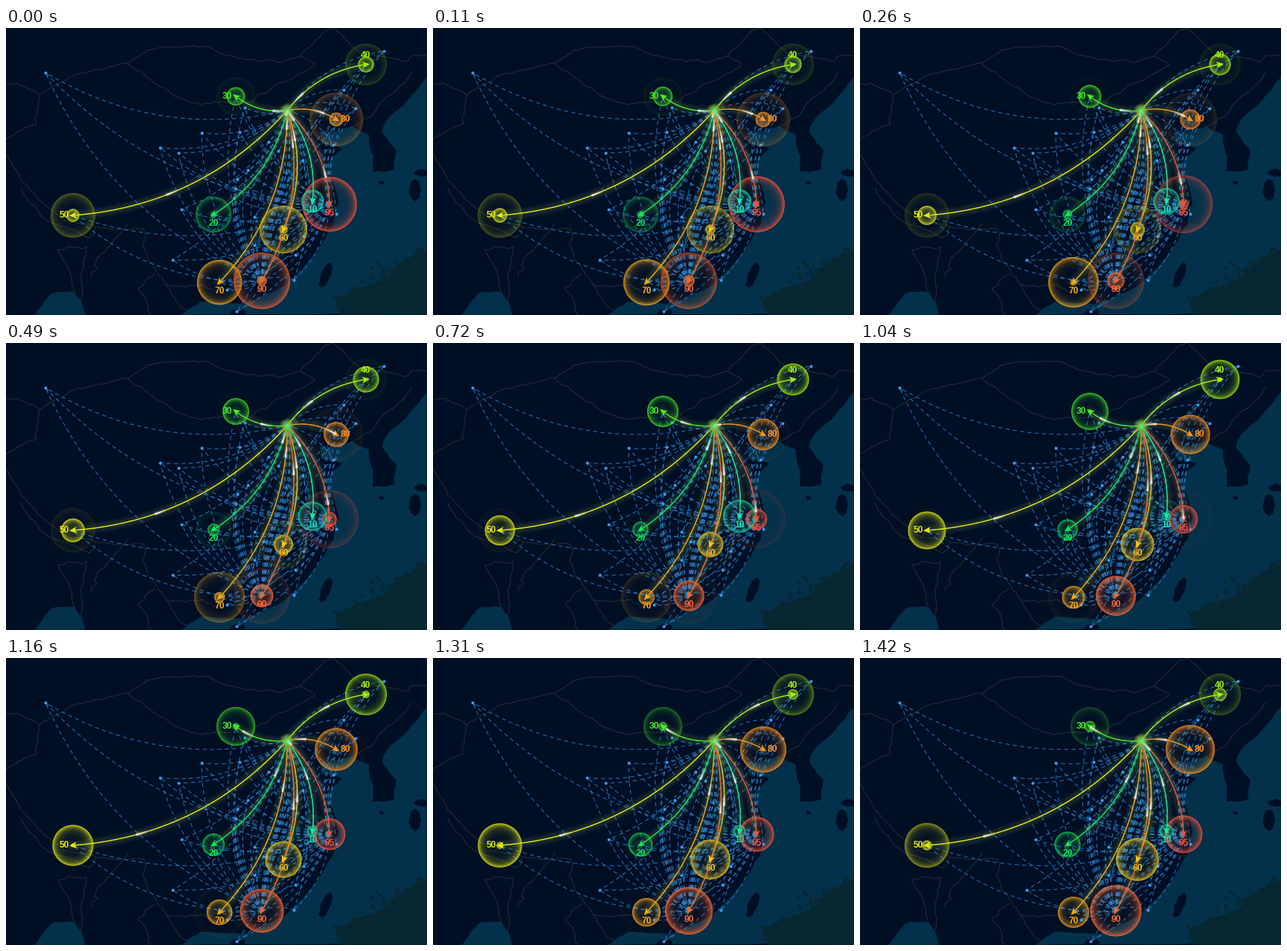
Animation, 566 px wide and 386 px high, one loop 1.52 s. Source, as a matplotlib script:

```python
import matplotlib.pyplot as plt
import numpy as np
from matplotlib.animation import FuncAnimation
from matplotlib.collections import LineCollection
from matplotlib.colors import LinearSegmentedColormap, to_rgb
from matplotlib.patches import Polygon

W, H, DPI = 566, 386, 64
PX = 72 / DPI                       # one pixel in points
TICK, LOOP = 10, 1520
STEP = 63.3                         # the picture holds for about this long
LAND, SEA, SHOAL = "#010f25", "#03314b", "#08262c"
BORDER, BLUE, HALO = "#2a3233", "#2a86d6", "#7f9a50"
ROOT = (378, 111)
SPEED = 0.038                       # comet speed, px per ms
OVERLAP = 300                       # a ring starts this long before the last ends
PARTS = 8
rng = np.random.default_rng(4)

RAMP = LinearSegmentedColormap.from_list(
    "ramp", ["#0cf0aa", "#08ea30", "#98f50c", "#f6e810", "#f8b010",
             "#ff8f1c", "#fb5038"])
SIDES = {"left": (-12, 0), "right": (12, 0), "up": (0, -12), "down": (0, 12)}


def arc(a, b, u, bend=0.2):
    """Quadratic curve from a to b, bent to one side."""
    u = np.asarray(u)[:, None]
    a, b = np.array(a, float), np.array(b, float)
    d = a - b
    c = (a + b) / 2 + bend * np.array([-d[1], d[0]])
    return (1 - u) ** 2 * a + 2 * u * (1 - u) * c + u ** 2 * b


class City:
    def __init__(self, value, x, y, side, start, life, comet):
        self.label, self.pos, self.side = str(value), (x, y), SIDES[side]
        self.color = RAMP((value - 10) / 85)
        self.reach = 20 + value / 5
        self.start, self.life, self.comet = start, life, comet
        self.path = arc(ROOT, self.pos, np.linspace(0, 1, 50))
        self.length = np.hypot(*np.diff(self.path, axis=0).T).sum()


# value, place, label side, ring start and life in ms, comet position
CITIES = [City(*row) for row in [
    (60, 373, 271, "down", -340, 1930, .21),
    (70, 287, 342, "down", -40, 2330, .07),
    (90, 344, 340, "down", -330, 1900, .18),
    (95, 435, 237, "down", -162, 2390, .70),
    (80, 444, 123, "right", -550, 2120, .64),
    (50, 90, 252, "left", -530, 1820, .59),
    (40, 484, 49, "up", -690, 1810, .19),
    (30, 309, 92, "left", -1000, 2100, .17),
    (20, 279, 251, "down", -386, 2450, .0),
    (10, 412, 233, "down", 404, 2300, .07),
]]


def rough(pts, amount, rounds=4):
    """Break each edge at a randomly shifted midpoint, several times."""
    pts = np.array(pts, float)
    for _ in range(rounds):
        mid = (pts[1:] + pts[:-1]) / 2
        mid += rng.normal(0, amount, mid.shape)
        out = np.empty((len(pts) * 2 - 1, 2))
        out[::2], out[1::2] = pts, mid
        pts, amount = out, amount / 2
    return pts


def make_axes(fig, z):
    ax = fig.add_axes([0, 0, 1, 1], zorder=z)
    ax.set(xlim=(0, W), ylim=(H, 0))
    ax.axis("off")
    return ax


def draw_map(ax):
    def area(pts, color, amount=1.2, **kw):
        ax.add_patch(Polygon(rough(pts, amount), fc=color, ec="none", **kw))

    # mainland coast from the north-east corner, around the peninsula, south
    area([(566, 66), (550, 86), (514, 121), (506, 140), (525, 165),
          (522, 190), (492, 193), (494, 172), (488, 144), (466, 131),
          (440, 140), (422, 140), (424, 156), (452, 162), (430, 184),
          (447, 232), (441, 262), (428, 285), (400, 322), (375, 346),
          (325, 370), (262, 368), (236, 386), (566, 386)], SEA)
    area([(38, 386), (60, 358), (92, 355), (106, 386)], SEA)
    area([(566, 298), (528, 318), (480, 348), (445, 363), (450, 386),
          (566, 386)], SHOAL, 3, alpha=.8)
    for k in rng.random(90):
        x, y = 455 + 111 * k, 362 - 70 * k
        x, y = rng.normal((x, y), (6, 7))
        ax.plot(x, y, "s", ms=rng.uniform(1, 4) * PX, mec="none", color=SHOAL)

    # islands: centre, half width, half height, slant
    for x, y, w, h, slant in [(430, 332, 7, 17, -6), (550, 218, 8, 15, 0),
                              (560, 195, 12, 5, 0), (505, 208, 4, 2, 0),
                              (312, 383, 10, 6, 0)]:
        a = np.linspace(0, 2 * np.pi, 9)
        area(np.column_stack([x + w * np.cos(a) + slant * np.sin(a),
                              y + h * np.sin(a)]), LAND, .8)

    borders = [
        [(163, 47), (212, 80), (262, 103), (330, 100), (368, 74), (415, 50),
         (395, 38)],
        [(163, 47), (190, 30), (270, 25), (340, 45), (395, 38), (440, 0)],
        [(0, 75), (45, 90), (40, 130), (0, 150)],
        [(45, 90), (95, 62), (163, 47)],
        [(440, 0), (480, 35), (535, 45), (566, 38)],
        [(545, 60), (510, 95), (468, 131)],
        [(0, 170), (30, 215), (85, 262), (140, 270), (185, 270), (190, 310),
         (215, 345), (262, 345), (285, 355)],
        [(20, 215), (50, 255), (112, 282), (120, 268)],
        [(92, 355), (70, 298), (108, 294), (100, 368)],
        [(165, 262), (122, 310), (115, 335)],
        [(200, 330), (178, 350), (195, 386)],
        [(215, 345), (248, 386)],
    ]
    ax.add_collection(LineCollection([rough(b, 3) for b in borders],
                                     colors=BORDER, lw=.9 * PX))


def draw_network(ax):
    towns = [(53, 60), (508, 31), (470, 108), (454, 83), (321, 107),
             (207, 161), (263, 141), (232, 168), (236, 244), (224, 312),
             (310, 381), (387, 339), (297, 352), (444, 250), (440, 157)]
    # the rest lie in a slanted belt across the east
    for k in np.linspace(0, 1, 14):
        x, y = 300 + 100 * rng.random() + 10 * k, 140 + 165 * k
        towns.append((x, y))
    u = np.linspace(0, 1, 30)
    hubs = [ROOT, (344, 340), (435, 237)]
    ends = towns + [c.pos for c in CITIES]
    links = [arc(h, e, u) for h in hubs for e in ends if h != e]
    ax.add_collection(LineCollection(links, colors=BLUE, lw=1.1 * PX,
                                     alpha=.8, linestyles=[(0, (5, 4))]))
    ax.plot(*zip(*towns), "o", ms=4 * PX, mec="none", color="#3a9cf5")


def draw_labels(ax):
    for c in CITIES:
        x, y = np.add(c.pos, c.side)
        ax.text(x, y, c.label, color=c.color, ha="center", va="center",
                family="Liberation Sans", weight="bold", size=12 * PX)


def draw_routes(ax):
    for c in CITIES:
        for width in (15, 11, 7):
            ax.plot(*c.path.T, color=HALO, alpha=.07, lw=width * PX)
        ax.plot(*c.path.T, color=c.color, lw=1.4 * PX)
        way = c.path[-1] - c.path[-2]
        way /= np.hypot(*way)
        side = np.array((-way[1], way[0]))
        shape = [(5, 0), (-5, 4.5), (-2.5, 0), (-5, -4.5)]
        ax.add_patch(Polygon([c.pos + f * way + s * side for f, s in shape],
                             fc=c.color, ec="none", zorder=3))
    for size, alpha in ((20, .1), (14, .2), (9, .35)):
        ax.plot(*ROOT, "o", ms=size * PX, mec="none", color="#7be03c",
                alpha=alpha, zorder=4)
    ax.plot(*ROOT, "o", ms=5 * PX, mec="none", color="#3cf08c", zorder=4)


GRID_Y, GRID_X = np.mgrid[0:H, 0:W] + 0.5


def ripples(t):
    """Expanding rings whose paint slowly fades behind them."""
    out = np.zeros((H, W, 4))
    for c in CITIES:
        (x, y), m = c.pos, int(c.reach) + 3
        box = (slice(max(y - m, 0), y + m), slice(max(x - m, 0), x + m))
        d = np.hypot(GRID_X[box] - x, GRID_Y[box] - y)
        clear = np.ones_like(d)
        for k in (-1, 0, 1):
            since = t - c.start - k * (c.life - OVERLAP)
            if since <= 0:
                continue
            radius = c.reach * min(since / c.life, 1)
            age = since - c.life * np.minimum(d / c.reach, 1)
            age = np.maximum(age, 0)
            paint = .55 * np.exp(-age / 180) + .4 * np.exp(-age / 420)
            clear *= 1 - paint * np.clip(radius - d + .5, 0, 1)
        a = (1 - clear)[..., None]
        out[box] = out[box] * (1 - a) + np.append(to_rgb(c.color), 1) * a
    out[..., :3] /= np.maximum(out[..., 3:], 1e-6)
    return (out * 255).astype(np.uint8)


def comet_segments(t):
    segs = []
    for c in CITIES:
        head = (c.comet + SPEED * t / c.length) % 1
        ends = np.clip([head - 9 / c.length, head + 7 / c.length], 0, 1)
        path = arc(ROOT, c.pos, np.linspace(*ends, PARTS + 1))
        segs += list(np.stack([path[:-1], path[1:]], axis=1))
    return segs


def comet_layer(ax, width, alpha, z):
    fade = np.tile(np.linspace(.1, alpha, PARTS), len(CITIES))
    colors = np.column_stack([np.ones((len(fade), 3)), fade])
    layer = LineCollection([], lw=width * PX, colors=colors, zorder=z,
                           capstyle="butt")
    return ax.add_collection(layer, autolim=False)


fig = plt.figure(figsize=(W / DPI, H / DPI), dpi=DPI, facecolor=LAND)
base, top = make_axes(fig, 0), make_axes(fig, 2)
draw_map(base)
draw_network(base)
draw_labels(base)
draw_routes(top)
rings = fig.figimage(ripples(0), origin="upper", zorder=1)
comets = [comet_layer(top, 5, .2, 5), comet_layer(top, 2.2, .95, 6)]


def update(i):
    held = int(i * TICK / STEP + .1)
    t = round(held * STEP, -1)
    rings.set_data(ripples(t))
    for layer in comets:
        layer.set_segments(comet_segments(t))
    return rings, *comets


anim = FuncAnimation(fig, update, frames=LOOP // TICK, interval=TICK,
                     init_func=lambda: update(0), repeat=True, repeat_delay=0)
plt.show()
```
